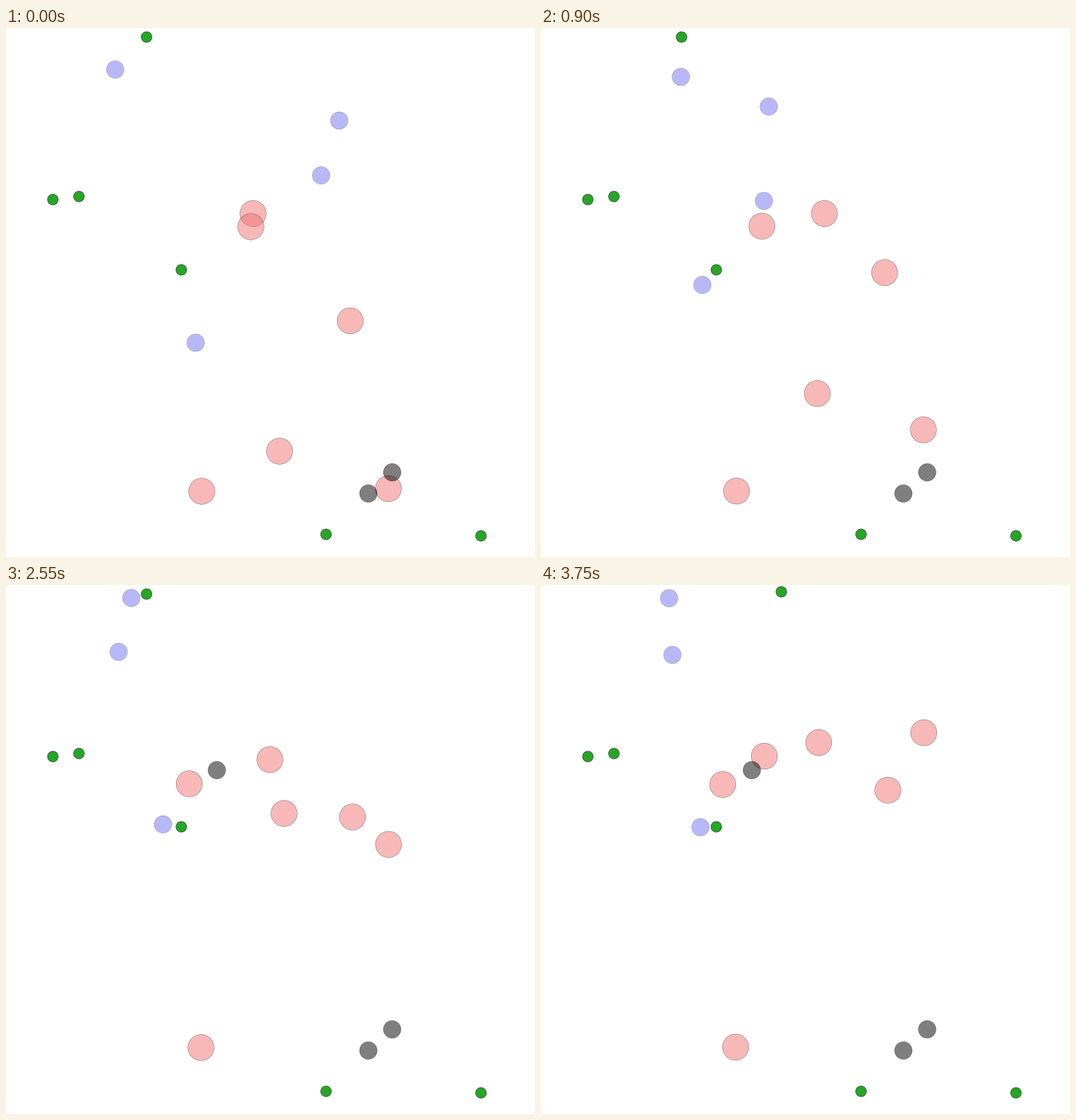
Recreate the animation shown at these times as a matplotlib script. Size 700 px wide and 700 px high, loop 3.9 s.

```python
import numpy as np
import matplotlib.pyplot as plt
from matplotlib.animation import FuncAnimation
from matplotlib.patches import Circle

SIZE, DPI = 700, 100
FRAMES, STEP_MS = 26, 150
DEATH, REGROW = 7, 25
STEPS = np.arange(FRAMES)

# kind: radius, fill, alpha, layer
STYLES = {
    "hunter": (17.3, (0.95, 0.45, 0.45), 0.5, 1),
    "grazer": (11.6, (0.08, 0.08, 0.92), 0.3, 2),
    "dead": (11.6, "black", 0.5, 3),
    "food": (7.1, (0.0, 0.59, 0.0), 0.85, 4),
}

# Turning points as (frame, x, y)
HUNTERS = [
    [(0, 327, 245.5), (6, 375, 245.5), (13, 366, 234), (25, 295.5, 226.5)],
    [(0, 324, 263), (9, 276, 262), (20, 238, 263.5), (25, 240.5, 264)],
    [(0, 455.5, 387.5), (9, 454.5, 305.5), (17, 458.5, 307), (25, 459, 271.5)],
    [(0, 362, 560), (9, 367, 436.5), (20, 368, 259), (25, 367.5, 208.5)],
    [(0, 506, 609.5), (9, 506, 482.5), (25, 506.5, 195.5)],
    [(0, 259, 613), (25, 257.5, 611.5)],
]
GRAZERS = [
    [(0, 144.5, 55), (4, 184.5, 64.5), (9, 186, 65), (17, 149, 88.5), (25, 174, 92.5)],
    [(0, 441, 122.5), (4, 349, 122.5), (9, 230, 76), (13, 164, 17), (25, 169.5, 17.5)],
    [(0, 251, 416.5), (4, 219.5, 358), (9, 204.5, 313), (25, 211, 320.5)],
    [(0, 417, 195), (4, 327, 196.5), (DEATH, 279, 245)],
]
DEAD = [(511, 588), (479.5, 616)]
FOOD = [(62, 227), (96.5, 223), (232, 320), (423.5, 670), (628.5, 672)]
EATEN, REGROWN = (186, 12), (318, 9)


def glide(t, v):
    """Monotone cubic through the points, setting off at half speed."""
    t, v = np.array(t, float), np.array(v, float)
    h = np.diff(t)
    d = np.diff(v) / h
    m = np.zeros(len(t))
    m[0], m[-1] = d[0] / 2, d[-1]
    for i in range(1, len(d)):
        if d[i - 1] * d[i] > 0:
            m[i] = 2 * d[i - 1] * d[i] / (d[i - 1] + d[i])
    k = np.clip(np.searchsorted(t, STEPS, side="right") - 1, 0, len(h) - 1)
    s = (STEPS - t[k]) / h[k]
    bend = s * (1 - s) * h[k] * ((1 - s) * m[k] - s * m[k + 1])
    return v[k] + s ** 2 * (3 - 2 * s) * (v[k + 1] - v[k]) + bend


def walk(t, v):
    return np.interp(STEPS, t, v)


def path(points, move):
    t, x, y = zip(*points)
    return np.column_stack((move(t, x), move(t, y)))


fig = plt.figure(figsize=(SIZE / DPI, SIZE / DPI), dpi=DPI, facecolor="white")
ax = fig.add_axes([0, 0, 1, 1])
ax.set_xlim(0, SIZE)
ax.set_ylim(SIZE, 0)
ax.axis("off")


def add(kind, pos):
    radius, fill, alpha, layer = STYLES[kind]
    return ax.add_patch(Circle(pos, radius, facecolor=fill, edgecolor="black",
                               linewidth=0.35, alpha=alpha, zorder=layer))


movers = []
for kind, routes, move in (("hunter", HUNTERS, glide), ("grazer", GRAZERS, walk)):
    for route in routes:
        movers.append((add(kind, route[0][1:]), path(route, move)))
victim = movers[-1][0]
corpse = add("dead", GRAZERS[-1][-1][1:])
for kind, spots in (("dead", DEAD), ("food", FOOD)):
    for spot in spots:
        add(kind, spot)
plant = add("food", EATEN)


def draw(frame):
    for circle, track in movers:
        circle.center = tuple(track[frame])
    victim.set_visible(frame < DEATH)
    corpse.set_visible(frame >= DEATH)
    plant.center = REGROWN if frame >= REGROW else EATEN
    return [circle for circle, _ in movers] + [corpse, plant]


anim = FuncAnimation(fig, draw, frames=FRAMES, interval=STEP_MS,
                     repeat=True, repeat_delay=0)
plt.show()
```
